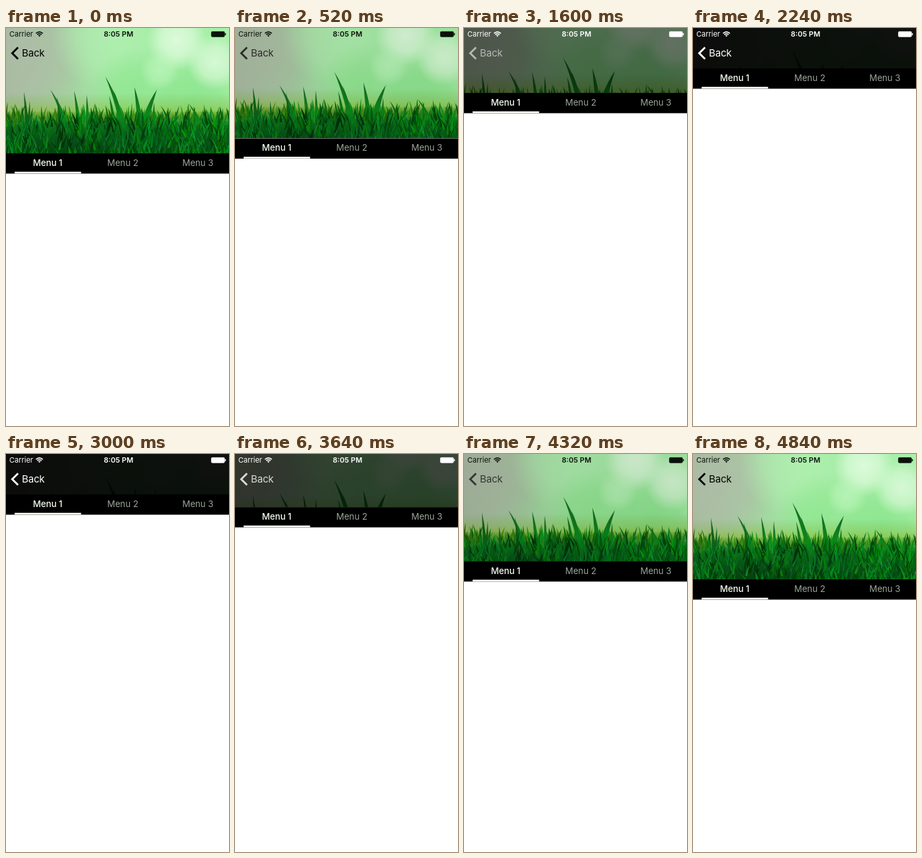
Recreate the animation shown at these times as an HTML page with a canvas. Size 337 by 600 pixels, loop 4880 ms.

```html
<!DOCTYPE html>
<html lang="en">
<head>
<meta charset="utf-8">
<title>Collapsing header</title>
<style>
html, body { margin: 0; width: 100%; height: 100%; overflow: hidden; background: #fff; }
#stage { position: relative; width: 337px; height: 600px; overflow: hidden; background: #fff; }
#header { position: absolute; left: 0; top: 0; width: 337px; overflow: hidden; background: #000; }
#photo { position: absolute; left: 0; top: 0; width: 337px; height: 190px; }
#shade { position: absolute; inset: 0; background: #000; }
svg { position: absolute; left: 0; top: 0; font-family: Inter, Roboto, sans-serif; }
</style>
</head>
<body>
<div id="stage">
  <div id="header"><canvas id="photo"></canvas><div id="shade"></div></div>
  <svg width="337" height="600">
    <g id="bar">
      <rect width="337" height="30.5"/>
      <g font-size="13.2" text-anchor="middle" fill="#9aa69a">
        <text x="63" y="19" fill="#f6fff2" font-weight="500">Menu 1</text>
        <text x="176.5" y="19">Menu 2</text>
        <text x="290" y="19">Menu 3</text>
      </g>
      <rect x="13" y="27.7" width="100.5" height="2.6" fill="#fffff8"/>
    </g>
    <g id="status" font-size="11">
      <text x="5" y="13">Carrier</text>
      <text x="170" y="13" font-weight="600" text-anchor="middle">8:05 PM</text>
      <g fill="none" stroke="currentColor" stroke-width="1.6">
        <path d="M45.3 8.2Q50.5 3.4 55.7 8.2M47.2 10.2Q50.5 7.2 53.8 10.2"/>
      </g>
      <path d="M48.7 11.3Q50.5 9.8 52.3 11.3L50.5 13.2Z"/>
      <rect x="310.4" y="5.4" width="19.8" height="7.8" rx="1.4" stroke="currentColor" stroke-width=".8"/>
      <rect x="330.8" y="7.7" width="1.4" height="3.2" rx=".6"/>
    </g>
    <g id="back">
      <path d="M18.2 29.3L9.4 38L18.2 46.7" fill="none" stroke="currentColor" stroke-width="2.9"/>
      <text x="24" y="43.3" font-size="15" letter-spacing="-.15">Back</text>
    </g>
  </svg>
</div>
<script>
const LOOP = 4880, TALL = 189, SHORT = 61, W = 337;
const $ = id => document.getElementById(id);

// [ms, header height]
const steps = [
  [0, 189], [200, 184], [400, 174], [560, 164], [920, 137], [1120, 121],
  [1360, 109], [1600, 98], [2240, 61], [3440, 61], [3640, 80], [4000, 117.5],
  [4040, 123], [4240, 149], [4480, 187], [4560, 189], [LOOP, 189]
];

// tip x, tip y, base x, width
const blades = [
  [3, 126, 12, 5], [27, 96, 33, 6], [36, 110, 34, 5], [53, 117, 56, 5],
  [67, 93, 97, 8], [77, 104, 84, 6], [103, 95, 112, 7], [122, 101, 124, 6],
  [134, 114, 128, 5], [150, 73, 181, 9], [156, 102, 166, 7], [163, 95, 178, 8],
  [194, 89, 205, 9], [228, 93, 204, 12], [224, 112, 222, 6], [246, 120, 236, 5],
  [262, 117, 250, 6], [276, 114, 304, 7], [322, 119, 314, 6], [335, 125, 326, 5]
];

let seed = 7;
const rnd = () => (seed = (seed * 16807) % 2147483647) / 2147483647;
const span = (a, b) => a + (b - a) * rnd();

function glow(c, x, y, r, rgb, alpha) {
  const g = c.createRadialGradient(x, y, 0, x, y, r);
  g.addColorStop(0, `rgba(${rgb},${alpha})`);
  g.addColorStop(.55, `rgba(${rgb},${alpha * .7})`);
  g.addColorStop(1, `rgba(${rgb},0)`);
  c.fillStyle = g;
  c.fillRect(0, 0, W, 190);
}

function blade(c, tx, ty, bx, by, w, fill) {
  const cy = ty + (by - ty) * .42, cx = bx + (tx - bx) * .3;
  c.fillStyle = fill;
  c.beginPath();
  c.moveTo(bx - w / 2, by);
  c.quadraticCurveTo(cx - w / 2, cy, tx, ty);
  c.quadraticCurveTo(cx + w / 2, cy, bx + w / 2, by);
  c.fill();
}

function fade(c, y0, y1, ...colors) {
  const g = c.createLinearGradient(0, y0, 0, y1);
  colors.forEach((col, i) => g.addColorStop(i / (colors.length - 1), col));
  return g;
}

function drawPhoto() {
  const cv = $('photo'), c = cv.getContext('2d'), k = Math.max(1, devicePixelRatio || 1);
  cv.width = W * k;
  cv.height = 190 * k;
  c.scale(k, k);

  const sky = c.createLinearGradient(0, 0, W, 0);
  sky.addColorStop(0, '#a5bc9f');
  sky.addColorStop(.28, '#a3d3a0');
  sky.addColorStop(.5, '#a2eba3');
  sky.addColorStop(1, '#a9f0aa');
  c.fillStyle = sky;
  c.fillRect(0, 0, W, 190);
  glow(c, 40, 40, 90, '176,186,168', .7);
  glow(c, 150, 15, 80, '180,240,180', .7);
  glow(c, 195, 100, 70, '135,228,135', .6);
  glow(c, 285, 110, 70, '130,226,132', .7);
  glow(c, 258, 18, 46, '226,252,224', .9);
  glow(c, 315, 52, 42, '222,250,220', .85);
  glow(c, 232, 64, 30, '190,246,190', .7);
  c.fillStyle = fade(c, 98, 136, 'rgba(120,170,60,0)', 'rgba(130,180,50,.35)', 'rgba(140,185,25,.85)');
  c.fillRect(0, 98, W, 40);
  c.fillStyle = fade(c, 126, 190, 'rgba(20,110,20,.1)', '#0c701a', '#07501a', '#05400f');
  c.fillRect(0, 126, W, 64);

  // distant blades
  for (let i = 0; i < 150; i++) {
    const x = span(-5, W + 5), y = span(138, 150);
    blade(c, x + span(-8, 8), y - span(12, 27), x, y, span(2, 4),
      `hsl(${span(95, 130)},80%,${span(16, 34)}%)`);
  }
  for (const [tx, ty, bx, w] of blades) {
    const mid = bx < 90 ? '#0c6418' : '#0a8c1c';
    blade(c, tx, ty, bx, 172, w, fade(c, ty, 172, '#1c6424', mid, '#04551a'));
  }
  // turf, back to front
  for (let i = 0; i < 620; i++) {
    const y = 146 + i / 620 * 56, x = span(-8, W + 8);
    const light = span(9, 29) + (x > 200 ? 3 : 0);
    blade(c, x + span(-13, 13), y - span(12, 30), x, y, span(1.5, 4),
      `hsl(${span(118, 138)},${span(75, 100)}%,${light}%)`);
  }
}

function heightAt(t) {
  let i = 1;
  while (steps[i][0] < t) i++;
  const [t0, h0] = steps[i - 1], [t1, h1] = steps[i];
  return h0 + (h1 - h0) * (t - t0) / (t1 - t0);
}

function tint(el, color) {
  el.setAttribute('fill', color);
  el.style.color = color;
}

function render() {
  const h = heightAt(performance.now() % LOOP);
  const p = (TALL - h) / (TALL - SHORT);
  const gray = Math.round(255 * p);
  $('header').style.height = h + 'px';
  $('photo').style.transform = `translateY(${(h - TALL) * .31}px)`;
  $('shade').style.opacity = .93 * p ** 1.6;
  $('bar').setAttribute('transform', `translate(0 ${h})`);
  tint($('back'), `rgb(${gray},${gray},${gray})`);
  tint($('status'), p > .5 ? '#fff' : '#0a120a');
  requestAnimationFrame(render);
}

drawPhoto();
render();
</script>
</body>
</html>
```
